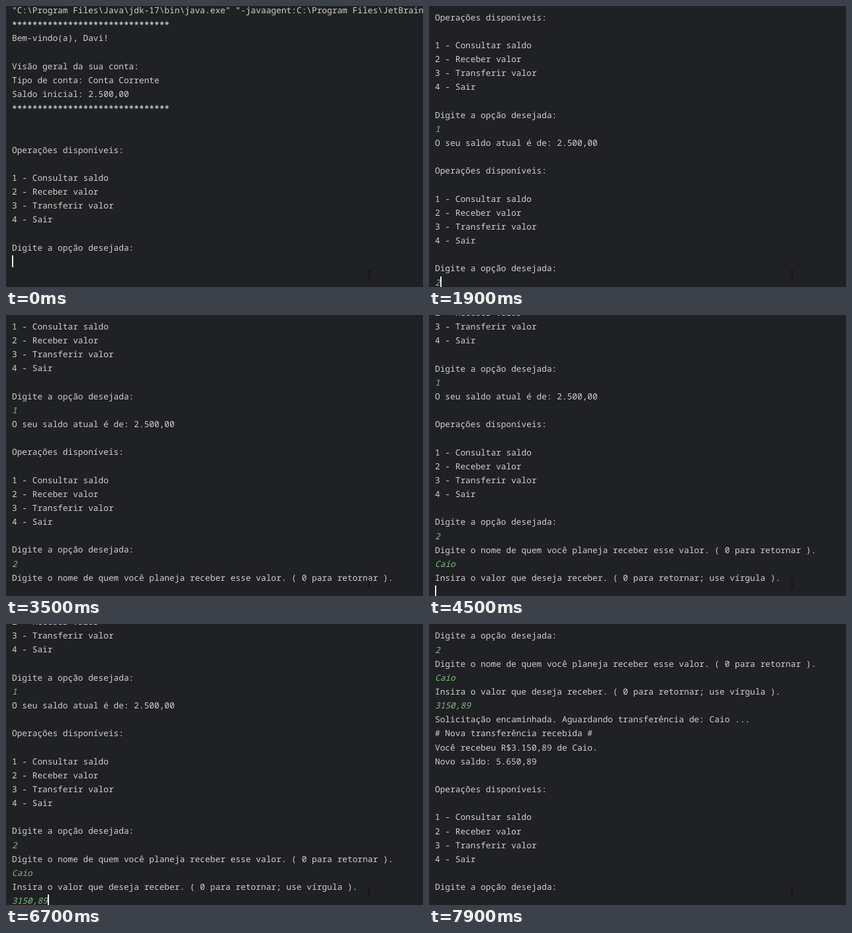
Animation, 630 px wide and 426 px high, one loop 8000 ms. Source, as an HTML page:

```html
<!DOCTYPE html>
<html lang="pt-BR">
<head>
<meta charset="utf-8">
<title>Console</title>
<style>
html, body { margin: 0; width: 100%; height: 100%; overflow: hidden; background: #202124; }
#stage { position: relative; width: 100%; height: 100%; overflow: hidden; contain: strict; }
#view { position: absolute; left: 9px; top: -4px; }
pre { margin: 0; font: 500 12.8px/21.15px "Noto Sans Mono", monospace; color: #d0d0cb; text-rendering: geometricPrecision; }
i { color: #7fba82; }
b { font-weight: 700; position: relative; top: 1px; color: #bccdd2; }
#caret { position: absolute; width: 2px; height: 18px; background: #eee; }
svg { position: absolute; left: 544px; top: 400px; }
</style>
</head>
<body>
<div id="stage">
  <div id="view"><pre id="text"></pre><div id="caret"></div></div>
  <svg width="9" height="14" fill="none" stroke="#0b0b0c"><path d="M1.5 1.5H3.5L4.5 2.5L5.5 1.5H7.5M4.5 2.5V11.5M1.5 12.5H3.5L4.5 11.5L5.5 12.5H7.5"/></svg>
</div>
<script>
const LOOP = 8000, STEP = 100, LINE = 21.15, CHAR = 7.68, BOTTOM = 412.6;
const stars = `<b>${'*'.repeat(31)}</b>`;
const menu = `
Operações disponíveis:

1 - Consultar saldo
2 - Receber valor
3 - Transferir valor
4 - Sair

Digite a opção desejada:
`;
const intro = String.raw`"C:\Program Files\Java\jdk-17\bin\java.exe" "-javaagent:C:\Program Files\JetBrains\IntelliJ` + `
${stars}
Bem-vindo(a), Davi!

Visão geral da sua conta:
Tipo de conta: Conta Corrente
Saldo inicial: 2.500,00
${stars}

`;

const out = (time, text) => ({ time, text, html: text, out: true });
const key = (time, text) => ({ time, text, html: `<i>${text}</i>` });
const log = [
  out(-1000, intro + menu),
  key(100, '1'),
  out(400, '\nO seu saldo atual é de: 2.500,00\n' + menu),
  key(1900, '2'),
  out(2300, '\nDigite o nome de quem você planeja receber esse valor. ( 0 para retornar ).\n'),
  key(3700, 'C'), key(4000, 'a'), key(4300, 'io'),
  out(4300, '\nInsira o valor que deseja receber. ( 0 para retornar; use vírgula ).\n'),
  key(5200, '3'), key(5400, '1'), key(5700, '5'), key(5900, '0'),
  key(6000, ','), key(6500, '8'), key(6700, '9'),
  out(6800, '\nSolicitação encaminhada. Aguardando transferência de: Caio ...\n'),
  out(7000, '# Nova transferência recebida #\nVocê recebeu R$3.150,89 de Caio.\nNovo saldo: 5.650,89\n' + menu)
];
const caretOff = [[1200, 1700], [3200, 3700], [5000, 5200], [7500, 8000]];

const view = document.getElementById('view');
const text = document.getElementById('text');
const caret = document.getElementById('caret');

const ease = p => { p = Math.min(1, Math.max(0, p)); return p * p * (3 - 2 * p); };

function draw(t) {
  const shown = log.filter(e => e.time <= t);
  let plain = '', scroll = 0;
  for (const e of shown) {
    plain += e.text;
    if (!e.out) continue;
    const goal = Math.max(0, (plain.split('\n').length - 1) * LINE - BOTTOM);
    scroll += (goal - scroll) * ease((t - e.time + 87) / 200);
  }
  const lines = plain.split('\n');
  text.innerHTML = shown.map(e => e.html).join('');
  view.style.transform = `translateY(${-Math.round(scroll)}px)`;
  caret.style.left = lines.at(-1).length * CHAR + 'px';
  caret.style.top = (lines.length - 1) * LINE + 1.4 + 'px';
  caret.hidden = caretOff.some(([a, b]) => t >= a && t < b);
}

const start = performance.now();
let last = -1;
function tick() {
  const t = Math.floor((performance.now() - start) % LOOP / STEP) * STEP;
  if (t !== last) draw(last = t);
  requestAnimationFrame(tick);
}
tick();
</script>
</body>
</html>
```
